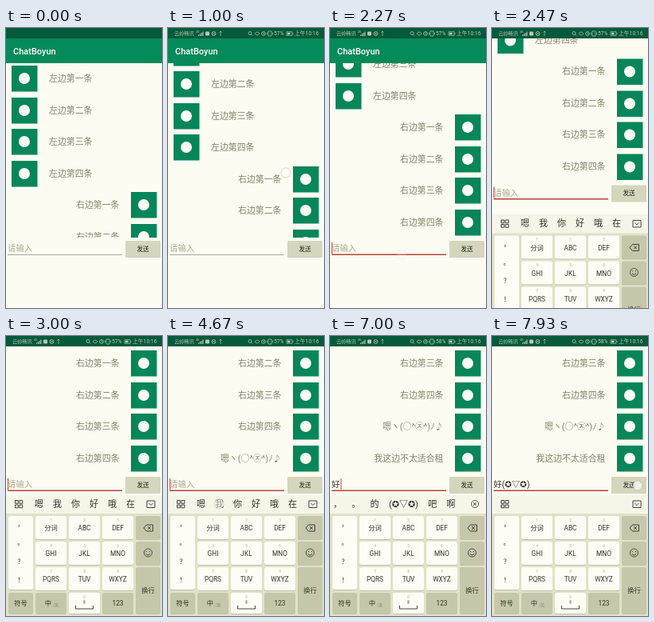
An HTML page with a canvas for the animation above (8000 ms loop, 196 px wide and 350 px high).

```html
<!DOCTYPE html>
<html lang="zh-CN">
<head>
<meta charset="utf-8">
<style>
html, body { margin: 0; width: 100%; height: 100%; overflow: hidden; background: #fcfcf2; }
canvas { display: block; width: 196px; height: 350px; }
</style>
</head>
<body>
<canvas></canvas>
<script>
const LOOP = 8000, W = 196, H = 350, ROW = 39.5, PAN = 90;
const FONT = 'Roboto, "Noto Sans CJK SC", "Noto Sans CJK", "DejaVu Sans", sans-serif';
const PAPER = '#fcfcf2', GREEN = '#058a5a', DARK = '#045a3a', INK = '#33332c';
const canvas = document.querySelector('canvas');
const g = canvas.getContext('2d');
const dpr = window.devicePixelRatio || 1;
canvas.width = W * dpr;
canvas.height = H * dpr;

const nums = ['一', '二', '三', '四'];
const face = '嗯ヽ(○^㉨^)ﾉ♪';
const messages = [
  ...nums.map(n => ({ text: `左边第${n}条`, left: true, at: 0 })),
  ...nums.map(n => ({ text: `右边第${n}条`, at: 0 })),
  { text: face, at: 4400 },
  { text: '我这边不太适合租', at: 6470 }
];

// Candidate bars
const HOME = ['嗯', '我', '你', '好', '哦', '在'];
const AFTER_EN = ['，', '。', face.slice(1), '好', '哦'];
const AFTER_HAO = ['，', '。', '的', '(✪▽✪)', '吧', '啊'];
const GUESS = ['，', '。', '的', '房', '记', '情人', '奇葩'];

// Start time, typed text, candidates
const typing = [
  [0, '', HOME],
  [3350, '嗯', AFTER_EN],
  [3850, face, []],
  [4400, '', HOME],
  [4750, '我', ['，', '。', '这边', '也', '在', '的']],
  [4950, '我这边', ['，', '。', '不太', '的', '有', '是']],
  [5270, '我这边不太', ['，', '。', '适合', '好', '想', '会']],
  [5380, '我这边不太适合', ['，', '。', '租', '你', '我', '的']],
  [5480, '我这边不太适合租', GUESS],
  [6470, '', HOME],
  [6900, '好', AFTER_HAO],
  [7400, '好(✪▽✪)', []]
];

// Touches: start, end, x, y, and the y where a drag ends
const touches = [
  [500, 1150, 148, 213, 171.4],
  [2120, 2310, 90, 283],
  [3220, 3420, 41, 210],
  [3720, 3920, 80, 210],
  [4230, 4430, 172, 187],
  [4600, 4780, 64, 210],
  [4840, 5000, 62, 210],
  [5130, 5300, 62, 210],
  [5300, 5420, 62, 210],
  [5410, 5560, 57, 210],
  [6270, 6500, 178, 187],
  [6770, 6970, 110, 210],
  [7270, 7470, 93, 210],
  [7800, 8080, 183, 187]
];

const clamp = v => Math.max(0, Math.min(1, v));
const easeOut = p => 1 - (1 - p) ** 2;
const span = (t, a, b) => clamp((t - a) / (b - a));

function box(x, y, w, h, color, r = 0) {
  g.fillStyle = color;
  g.beginPath();
  g.roundRect(x, y, w, h, r);
  g.fill();
}

function label(s, x, y, size, color, align = 'left', weight = 400) {
  g.font = `${weight} ${size}px ${FONT}`;
  g.textAlign = align;
  g.fillStyle = color;
  g.fillText(s, x, y + size * 0.36);
}

function stroke(path, color = INK, width = 0.9) {
  g.strokeStyle = color;
  g.lineWidth = width;
  g.stroke(new Path2D(path));
}

function ring(x, y, r, color = INK, width = 0.8) {
  g.strokeStyle = color;
  g.lineWidth = width;
  g.beginPath();
  g.arc(x, y, r, 0, 7);
  g.stroke();
}

function clipTo(x, y, w, h, draw) {
  g.save();
  g.beginPath();
  g.rect(x, y, w, h);
  g.clip();
  draw();
  g.restore();
}

function drawMessages(t) {
  const extra = messages.filter(m => m.at && t >= m.at).length;
  const drag = 41.6 * span(t, 500, 1150) + 55.4 * easeOut(span(t, 1150, 1750));
  const scroll = drag + extra * ROW;
  clipTo(0, 44, W, 218, () => messages.forEach((m, i) => {
    if (t < m.at) return;
    const y = Math.round(47 + i * ROW - scroll), x = m.left ? 7 : 157;
    box(x, y, 32.5, 32.5, '#07865a');
    box(x + 9, y + 9, 14, 14, '#fbfdf4', 7);
    label(m.text, m.left ? 54 : 142.5, y + 16, 10.9, '#85846a', m.left ? 'left' : 'right');
  }));
}

function drawInput(t, text, since) {
  const focused = t >= 2200;
  label(text || '请输入', 2, 275.3, 10.4, text ? INK : '#adab90');
  if (focused && (t - Math.max(since, 2560)) % 1000 < 500) {
    const x = text ? 3 + g.measureText(text).width : 2;
    box(x, 268, 1, 14, '#cf3b34');
  }
  box(2, focused ? 282.5 : 283, 144, focused ? 1.4 : 0.8, focused ? '#b8453a' : '#8e8c78');
  box(150, 266, 44, 21, '#d6d5bd', 1);
  label('发送', 172, 276, 7.6, '#24241c', 'center', 500);
}

function drawStatus(t) {
  box(0, 0, W, 13, DARK);
  if (t < 70) return;
  const c = '#b4cab8';
  label('云岭畅讯', 8, 7, 6.2, c);
  label('4G', 35, 5, 3.5, c);
  for (let i = 0; i < 4; i++) box(38 + i * 1.8, 8.5 - i * 1.3, 1.1, 1.5 + i * 1.3, c);
  box(47, 4.5, 5, 5, c, 1);
  ring(57.5, 7, 2.5, c);
  stroke('M56 5.5l3 3m0-3l-3 3M66 4v6m-1.5-4.5l1.5-1.5 1.5 1.5', c, 0.7);
  ring(103, 6.5, 2, c);
  stroke('M104.5 8l1.8 1.8M109 7q3-4 6 0q-3 4-6 0', c, 0.7);
  ring(120, 7, 2.4, c);
  stroke('M120 5.5v1.7h1.4M126 4h4v6h-4zM124.5 5.5v3M131.5 5.5v3', c, 0.7);
  label(t < 6470 ? '57%' : '58%', 133, 7, 6.7, c);
  stroke('M149 4.7h7v4.6h-7zM157 6v2', c, 0.7);
  box(150, 5.7, 3.5, 2.6, c);
  label('上午10:16', 189.5, 7, 6.8, c, 'right');
}

function drawCandidates(words) {
  box(0, 199, W, 23, '#f5f5e8');
  if (words === HOME || !words.length) {
    for (const x of [11.5, 17]) for (const y of [205.5, 211]) {
      stroke(`M${x} ${y}h3.8v3.8h-3.8z`);
    }
    stroke('M177 206h10v8.5h-10zM179.5 209l2.5 2.5 2.5-2.5');
    words.forEach((s, i) => label(s, 41.5 + i * 23, 210, 11, INK, 'center'));
    return;
  }
  clipTo(0, 199, 172, 23, () => {
    let x = 4;
    for (const s of words) {
      label(s, x, 210, 11, INK);
      x += g.measureText(s).width + 12.3;
    }
  });
  ring(182, 210, 4.5);
  stroke('M180.2 208.2l3.6 3.6m0-3.6l-3.6 3.6');
}

function key(x, y, w, h, color = '#fdfdf5') {
  box(x, y + 0.8, w, h, '#b9b99e', 2.5);
  box(x, y, w, h, color, 2.5);
}

function drawKeyboard(words) {
  const gray = '#c6c6aa';
  box(0, 199, W, 151, '#e1e1ca');
  drawCandidates(words);
  key(3, 225, 31, 92);
  ['，', '。', '？', '！'].forEach((s, i) => label(s, 18.5, 235 + i * 23.3, 8.5, INK, 'center'));
  ['分词', 'ABC', 'DEF', 'GHI', 'JKL', 'MNO', 'PQRS', 'TUV', 'WXYZ'].forEach((s, i) => {
    const x = 37 + i % 3 * 42, y = 225 + Math.floor(i / 3) * 32;
    key(x, y, 39, 29);
    label(i + 1, x + 19.5, y + 5, 4.8, '#b9ae84', 'center');
    label(s, x + 19.5, y + 15.5, 8.3, INK, 'center');
  });
  key(163, 225, 31, 29, gray);
  stroke('M173 240l3.5-4h8v8h-8zM178.3 238.2l3.6 3.6m0-3.6l-3.6 3.6');
  key(163, 257, 31, 29, gray);
  ring(178.5, 271, 5);
  stroke('M176.4 269v1M180.6 269v1M175.8 272.2q2.7 3.2 5.4 0');
  key(163, 289, 31, 58, gray);
  label('换行', 178.5, 318, 8.3, INK, 'center');
  key(3, 321, 31, 26, gray);
  label('符号', 18.5, 334, 8.3, INK, 'center');
  key(37, 321, 39, 26, gray);
  label('中', 53, 334, 8.3, INK, 'center');
  label('/英', 59, 336, 5, '#8b8b73');
  key(79, 321, 39, 26);
  label('0', 98.5, 326, 4.8, '#b9ae84', 'center');
  box(97.3, 330, 2.4, 5, '#b3ad8b', 1.2);
  stroke('M87.5 337v4h22v-4');
  key(121, 321, 39, 26, gray);
  label('123', 140.5, 334, 8.3, INK, 'center');
}

function drawTouches(t) {
  for (const [a, b, x, y0, y1 = y0] of touches) {
    if (t < a || t >= b) continue;
    const y = y0 + (y1 - y0) * span(t, a, b);
    g.globalAlpha = span(t, b, b - 130);
    box(x - 6, y - 6, 12, 12, 'rgba(255,255,250,.6)', 6);
    ring(x, y, 6, 'rgba(150,145,125,.5)', 0.7);
    g.globalAlpha = 1;
  }
}

function draw(t) {
  const [since, text, words] = typing.findLast(s => t >= s[0]);
  const open = easeOut(span(t, 2330, 2600));
  g.setTransform(dpr, 0, 0, dpr, 0, 0);
  box(0, 0, W, H, PAPER);
  g.save();
  g.translate(0, -PAN * open);
  drawMessages(t);
  box(0, 13, W, 31, GREEN);
  label('ChatBoyun', 9, 29, 11, '#fff', 'left', 500);
  drawInput(t, text, since);
  g.restore();
  if (open) {
    g.save();
    g.translate(0, 151 * (1 - open));
    drawKeyboard(words);
    g.restore();
  }
  drawStatus(t);
  drawTouches(t);
}

const start = performance.now();
function tick() {
  draw((performance.now() - start) % LOOP);
  requestAnimationFrame(tick);
}
tick();
</script>
</body>
</html>
```
